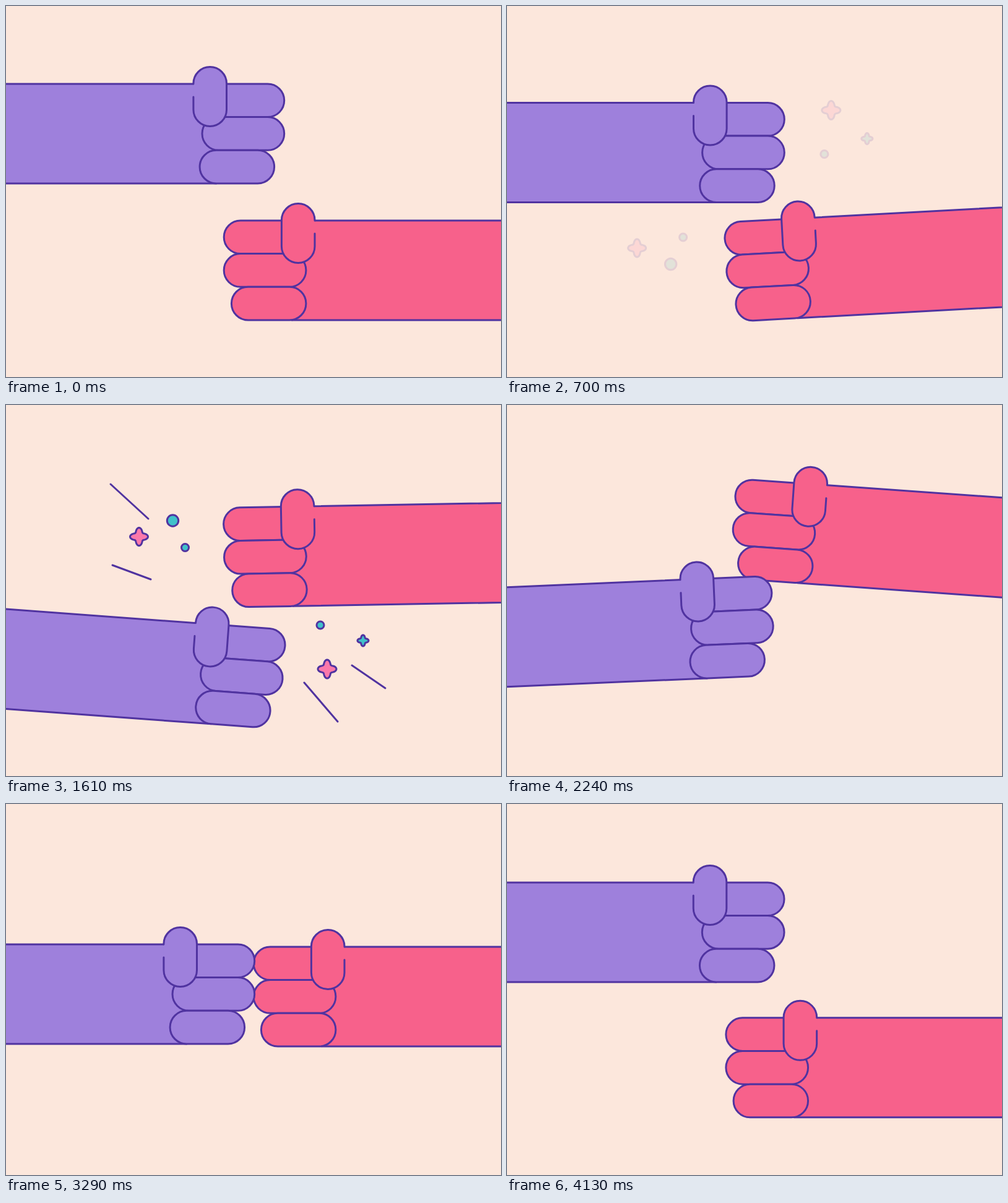
Recreate the animation shown at these times as an HTML page. Size 800 by 600 pixels, loop 4200 ms.

```html
<!DOCTYPE html>
<html lang="en">
<head>
<meta charset="utf-8">
<title>Fist bump</title>
<style>
html, body { margin: 0; width: 100%; height: 100%; overflow: hidden; background: #fce7dc; }
svg { display: block; width: 100%; height: 100%; }
#stage { stroke: #5033a0; stroke-width: 3; stroke-linecap: round; stroke-linejoin: round; }
#purple { fill: #9e80dc; }
#pink { fill: #f7618b; }
.rose { fill: #fb78ab; }
.teal { fill: #40c1ca; }
</style>
</head>
<body>
<svg viewBox="0 0 800 600">
  <g id="stage">
    <g id="sparks"></g>
    <g id="pink"></g>
    <g id="purple"></g>
  </g>
</svg>
<script>
const LOOP = 4200, STEP = 70, BUMP = 1050;
const get = id => document.getElementById(id);

// Each fist: distance pulled back, thumb centre y, droop in degrees
const poses = {
  rest:   { upper: [0, 146.5, 0],      lower: [0, 367.5, 0] },
  windup: { upper: [0, 107, -2],       lower: [0, 406, 2] },
  hit:    { upper: [0, 183, 1],        lower: [0, 345, 0] },
  recoil: { upper: [-.7, 184.7, 1],    lower: [-2, 375, 4.2] },
  settle: { upper: [1.4, 177, 0],      lower: [-.7, 364, 3.1] },
  cross:  { upper: [100, 265, 0],      lower: [100, 265, 0] },
  swap:   { upper: [63, 152.6, .1],    lower: [63, 361.8, 0] },
  part:   { upper: [17, 148.3, -4.06], lower: [22, 302, -2.45] },
  pull:   { upper: [165, 251.5, 0],    lower: [165, 247.5, 0] },
  touch:  { upper: [48, 251.5, 0],     lower: [48, 247.5, 0] },
  lift:   { upper: [85, 215, 0],       lower: [85, 288, 0] }
};

// The fists trade places after the first bump and again before the loop ends
const timeline = { purple: [], pink: [] };
function key(time, name, top) {
  for (const fist in timeline)
    timeline[fist].push([time, ...poses[name][fist === top ? "upper" : "lower"]]);
}
function bump(start, top) {
  key(start + 210, "windup", top);
  key(start + 350, "hit", top);
  key(start + 560, "recoil", top);
  key(start + 700, "settle", top);
}
key(0, "rest", "purple");
bump(0, "purple");
key(890, "cross", "pink");
key(BUMP, "swap", "pink");
bump(BUMP, "pink");
key(2240, "part", "pink");
key(2590, "pull", "pink");
key(2800, "touch", "pink");
key(3570, "touch", "pink");
key(3800, "lift", "purple");
key(4160, "rest", "purple");
key(LOOP, "rest", "purple");

// Smooth curve through the keys that never overshoots them
function sample(keys, t, col) {
  let i = 0;
  while (i < keys.length - 2 && t >= keys[i + 1][0]) i++;
  const slope = j => j < 0 || j > keys.length - 2 ? 0 :
    (keys[j + 1][col] - keys[j][col]) / (keys[j + 1][0] - keys[j][0]);
  const tangent = j => {
    const a = slope(j - 1), b = slope(j);
    return a * b > 0 ? 2 * a * b / (a + b) : 0;
  };
  const span = keys[i + 1][0] - keys[i][0], u = (t - keys[i][0]) / span, v = 1 - u;
  return keys[i][col] * v * v * (1 + 2 * u) + keys[i + 1][col] * u * u * (3 - 2 * u) +
    span * u * v * (tangent(i) * v - tangent(i + 1) * u);
}

function drawFist(id, reach, dir, t) {
  const [back, y, droop] = [1, 2, 3].map(col => sample(timeline[id], t, col));
  get(id).setAttribute("transform",
    `translate(${reach - dir * back} ${y}) rotate(${dir * droop}) scale(${dir} 1)`);
}

const capsule = (x, y, w) => `<rect x="${x}" y="${y}" width="${w}" height="53.7" rx="26.8"/>`;

function hand(littleX) {
  return `<path d="M-900-20.5H93.2a26.8 26.8 0 0 1 0 53.6H10V140.5H-900"/>
    ${capsule(-12.7, 33.1, 132.7)}${capsule(littleX, 86.8, 120.5)}
    <path d="M-26.8-20.5v-.7a26.8 26.8 0 0 1 53.6 0V21.2a26.8 26.8 0 0 1-53.6 0V.5"/>`;
}

const particle = (x, y, shape) => `<g data-x="${x}" data-y="${y}">${shape}</g>`;
const dot = (x, y, r) => particle(x, y, `<circle class="teal" r="${r}"/>`);
const ray = d => `<path class="ray" pathLength="1" fill="none" d="${d}"/>`;

function star(x, y, r, tone) {
  const points = Array.from({ length: 64 }, (_, i) => {
    const a = i * Math.PI / 32, d = r * (.79 + .21 * Math.cos(4 * a));
    return `${d * Math.cos(a)},${d * Math.sin(a)}`;
  });
  return particle(x, y, `<polygon class="${tone}" points="${points.join(" ")}"/>`);
}

const leftBurst = star(215, 213, 14.5, "rose") + dot(269.5, 187, 9.2) + dot(289.5, 230.5, 6) +
  ray("M230 184L169 128") + ray("M234 282L172 259");
const rightBurst = star(519, 427, 15, "rose") + star(577, 381, 9, "teal") + dot(508, 356, 6) +
  ray("M559 421L613 458") + ray("M482 449L536 512");
const pair = `<g data-side="-1">${leftBurst}</g><g data-side="1">${rightBurst}</g>`;

get("purple").innerHTML = hand(-16.6);
get("pink").innerHTML = hand(-12.7);
get("sparks").innerHTML =
  `<g id="falling">${pair}</g><g id="rising" transform="matrix(1 0 0 -1 0 600)">${pair}</g>`;
const sides = [...document.querySelectorAll("[data-side]")];
const particles = [...document.querySelectorAll("[data-x]")];
const rays = [...document.querySelectorAll(".ray")];

// The last, head-on hit fires both mirrored bursts and throws them further
const hits = [
  { time: 350, rising: true, push: 0 },
  { time: BUMP + 350, falling: true, push: 0 },
  { time: 2800, rising: true, falling: true, push: 1 }
];
const show = (el, on) => el.style.display = on ? "" : "none";

function drawSparks(t) {
  const hit = hits.find(h => t >= h.time && t < h.time + 6 * STEP);
  show(get("sparks"), hit);
  if (!hit) return;
  show(get("rising"), hit.rising);
  show(get("falling"), hit.falling);

  const age = (t - hit.time) / STEP;
  const drift = .25 - (1 - age / 6) ** 2;
  const push = hit.push * (age / 5) ** 2;
  const grow = Math.min(1, .4 + age * .3);
  const head = Math.min(1, (age + 1) / 3);
  const tail = Math.max(0, (age - 3) * .55);
  get("sparks").setAttribute("opacity", Math.min(1, 1 - (age - 3) * .43));

  for (const side of sides) {
    const dir = Number(side.dataset.side);
    side.setAttribute("transform",
      `translate(${dir * (22 * drift + 70 * push)} ${dir * (20 * drift + 62 * push)})`);
  }
  for (const p of particles)
    p.setAttribute("transform", `translate(${p.dataset.x} ${p.dataset.y}) scale(${grow})`);
  for (const r of rays) {
    show(r, tail < 1);
    r.setAttribute("stroke-dasharray", `${Math.max(0, head - tail)} 3`);
    r.setAttribute("stroke-dashoffset", -tail);
  }
}

function draw(now) {
  let tick = Math.floor(now % LOOP / STEP);
  if (tick % 15 === 1) tick--; // one held beat in every fifteen
  const t = tick * STEP;
  drawFist("purple", 329.7, 1, t);
  drawFist("pink", 472.2, -1, t);
  drawSparks(t);
}

const start = performance.now();
function play() {
  draw(performance.now() - start);
  requestAnimationFrame(play);
}
play();
</script>
</body>
</html>
```
